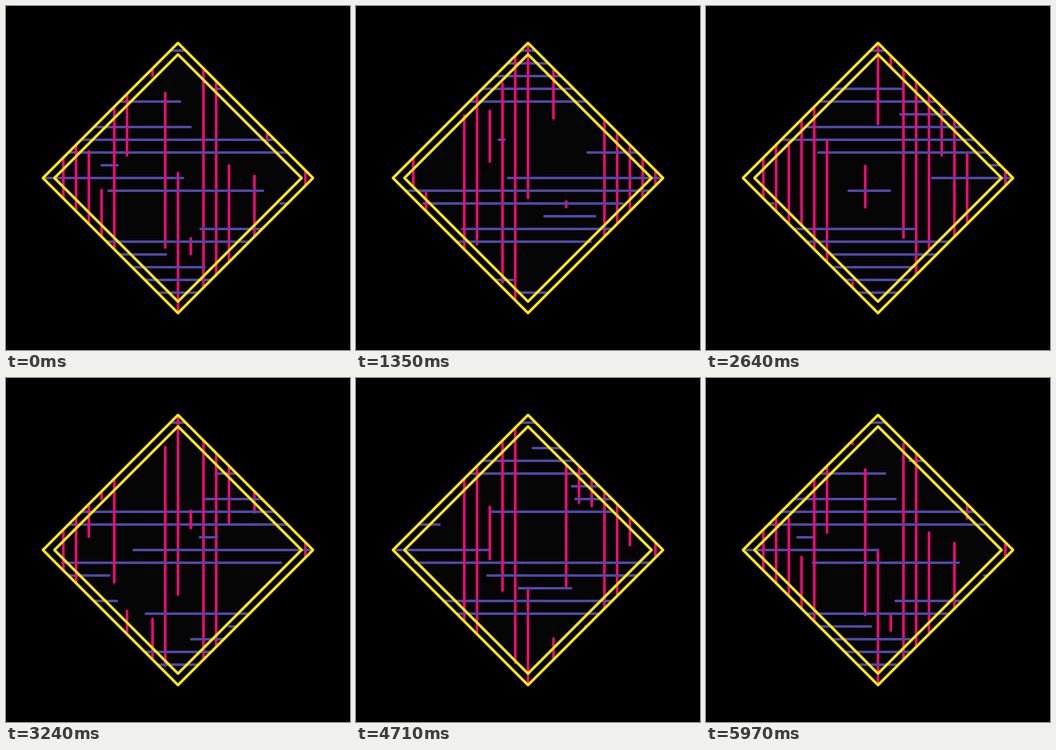
Animation, 540 px wide and 540 px high, one loop 6 s. Source, as an HTML page with a canvas:

```html
<!DOCTYPE html>
<html lang="en">
<head>
<meta charset="utf-8">
<title>Woven diamond</title>
<style>
  html, body { margin: 0; width: 100%; height: 100%; overflow: hidden; background: #000; }
  canvas { display: block; width: 540px; height: 540px; }
</style>
</head>
<body>
<canvas id="stage" width="540" height="540"></canvas>
<script>
const ctx = document.getElementById('stage').getContext('2d');
const LOOP = 6000, STEP = 30, TAU = Math.PI * 2;
const CENTER = 270, OUTER = 212, INNER = 194;
const GAP = 20, SIDE = 10, SWING = 250;
const SIN_LAG = TAU * 6 / 71, COS_LAG = TAU * 13 / 71; // phase shift per thread
const BLUE = '#5048a5', PINK = '#ff0578', YELLOW = '#ffe814', FILL = '#050505';

function diamond(r) {
  ctx.beginPath();
  ctx.moveTo(0, -r);
  ctx.lineTo(r, 0);
  ctx.lineTo(0, r);
  ctx.lineTo(-r, 0);
  ctx.closePath();
}

function line(color, x1, y1, x2, y2) {
  ctx.strokeStyle = color;
  ctx.beginPath();
  ctx.moveTo(x1, y1);
  ctx.lineTo(x2, y2);
  ctx.stroke();
}

function draw(t) {
  const angle = (t + STEP) / LOOP * TAU;
  ctx.setTransform(1, 0, 0, 1, 0, 0);
  ctx.fillStyle = '#000';
  ctx.fillRect(0, 0, 540, 540);
  ctx.translate(CENTER, CENTER);
  ctx.lineWidth = 4;
  ctx.lineCap = ctx.lineJoin = 'round';

  ctx.save();
  diamond(OUTER);
  ctx.fillStyle = FILL;
  ctx.fill();
  ctx.clip();
  // Each pair mirrors across the anti-diagonal; later pairs lie on top.
  for (let k = -SIDE; k <= SIDE; k++) {
    const d = k * GAP;
    const a = SWING * Math.sin(angle + k * SIN_LAG);
    const b = -SWING * Math.cos(angle - k * COS_LAG);
    line(PINK, -d, -a, -d, -b);
    line(BLUE, a, d, b, d);
  }
  ctx.restore();

  ctx.strokeStyle = YELLOW;
  for (const r of [OUTER, INNER]) {
    diamond(r);
    ctx.stroke();
  }
}

const start = performance.now();
function tick() {
  const t = (performance.now() - start) % LOOP;
  draw(Math.floor(t / STEP) * STEP);
  requestAnimationFrame(tick);
}
tick();
</script>
</body>
</html>
```
